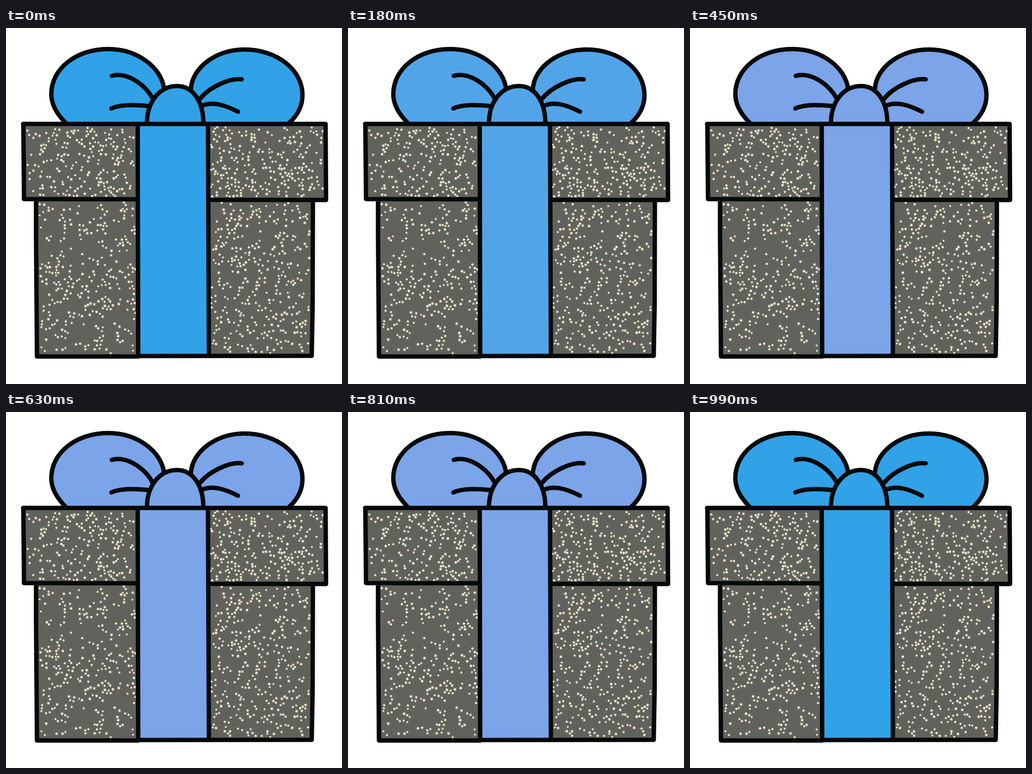
An HTML page with a canvas that plays this animation: 727x770 px, repeating every 1080 ms.

```html
<!DOCTYPE html>
<html lang="en">
<head>
<meta charset="utf-8">
<title>Gift box</title>
<style>
  html, body { margin: 0; width: 100%; height: 100%; overflow: hidden; background: #fff; }
  canvas { display: block; }
</style>
</head>
<body>
<canvas id="stage" width="727" height="770"></canvas>
<script>
const W = 727, H = 770, STEP = 90, STEPS = 12;
const ctx = document.getElementById('stage').getContext('2d');

const INK = '#050909', PAPER = '#62625d';
const BLUE = '#31a2e8', AZURE = '#41a3e8', SKY = '#52a4e9', PERIWINKLE = '#7ba4e9';

const bowLeft = 'M129 205 C107 183 98 162 98 143 C98 88 152 45.5 221 45.5 C285 45.5 337 86 342 132';
const bowRight = 'M612 206 C633 187 641.5 165 641.5 145 C641.5 90 586 46.5 516 46.5 C455 46.5 403 85 400 132';
const knot = new Path2D('M305 206 C305 160 332 125.5 370 125.5 C405 125.5 427 160 427 206');
const bows = [[bowLeft, 'L322 206 Z'], [bowRight, 'L412 206 Z']]
  .map(([line, close]) => ({ line: new Path2D(line), area: new Path2D(line + close) }));
const creases = new Path2D(
  'M229 103.5 C262 93 307 126 319 157 M228 174 C250 164.5 280 166 310 169 ' +
  'M510 111 C485 107 440 128 420 153 M502 181 C480 170 452 158 427 167');
const band = new Path2D('M285 207 L437 207 L439 709 L286 710 Z');
const box = new Path2D(
  'M37 207.5 L691.5 207.5 L692.5 372 L439 371.5 M37.5 207.5 L39 370 L285 370.5 ' +
  'M65 372 L65 450 L67 710.5 L286 710.5 M286 709.5 L661.5 709 L663.5 598 L664 373 ' +
  'M285 207.5 L286 710 M437 207.5 L439 709');

// x, y, width, height, number of sparkles
const panels = [
  [38, 207, 247, 164, 200],
  [437, 207, 255, 165, 235],
  [66, 371, 220, 339, 295],
  [438, 371, 225, 338, 345]
];

function makeRandom(seed) {
  return () => {
    seed = (seed + 0x6d2b79f5) | 0;
    let t = Math.imul(seed ^ (seed >>> 15), 1 | seed);
    t = (t + Math.imul(t ^ (t >>> 7), 61 | t)) ^ t;
    return ((t ^ (t >>> 14)) >>> 0) / 4294967296;
  };
}

function sparkle(g, x, y, r, tint) {
  const glow = g.createRadialGradient(x, y, 0, x, y, r);
  glow.addColorStop(0, '#fffff4');
  glow.addColorStop(0.36, '#fbfbe6');
  glow.addColorStop(0.62, `rgba(${tint},.5)`);
  glow.addColorStop(1, `rgba(${tint},0)`);
  g.fillStyle = glow;
  g.fillRect(x - r, y - r, 2 * r, 2 * r);
}

function makeGlitter() {
  const layer = document.createElement('canvas');
  layer.width = W;
  layer.height = H;
  const g = layer.getContext('2d');
  const rand = makeRandom(41);
  const tints = ['226,222,178', '214,226,190', '232,205,170'];

  for (const [x, y, w, h, count] of panels) {
    g.fillStyle = PAPER;
    g.fillRect(x, y, w, h);
    const dots = [];
    while (dots.length < count) {
      let px = x + 6 + rand() * (w - 12), py = y + 6 + rand() * (h - 12);
      // some sparkles sit beside an earlier one, forming short chains
      if (dots.length && rand() < 0.25) {
        const near = dots[Math.floor(rand() * dots.length)];
        const a = rand() * Math.PI * 2, d = 6 + rand() * 4;
        px = near[0] + Math.cos(a) * d;
        py = near[1] + Math.sin(a) * d;
      }
      const inside = px > x + 6 && px < x + w - 6 && py > y + 6 && py < y + h - 6;
      if (!inside || dots.some(q => Math.hypot(q[0] - px, q[1] - py) < 5)) continue;
      dots.push([px, py]);
      sparkle(g, px, py, 3 + rand() * 1.3, tints[Math.floor(rand() * tints.length)]);
    }
  }
  return layer;
}

const glitter = makeGlitter();

function ribbonColor(step) {
  if (step === 0 || step === 11) return BLUE;
  if (step === 1) return AZURE;
  if (step === 2 || step === 10) return SKY;
  return PERIWINKLE;
}

function draw(color) {
  ctx.fillStyle = '#fff';
  ctx.fillRect(0, 0, W, H);
  ctx.drawImage(glitter, 0, 0);
  ctx.fillStyle = color;
  ctx.strokeStyle = INK;
  ctx.lineCap = ctx.lineJoin = 'round';
  ctx.lineWidth = 9.5;
  for (const bow of bows) {
    ctx.fill(bow.area);
    ctx.stroke(bow.line);
  }
  ctx.stroke(creases);
  ctx.fill(knot);
  ctx.stroke(knot);
  ctx.fill(band);
  ctx.stroke(box);
}

const start = performance.now();
function tick() {
  const t = Math.max(0, performance.now() - start);
  draw(ribbonColor(Math.floor(t / STEP) % STEPS));
  requestAnimationFrame(tick);
}
tick();
</script>
</body>
</html>
```
